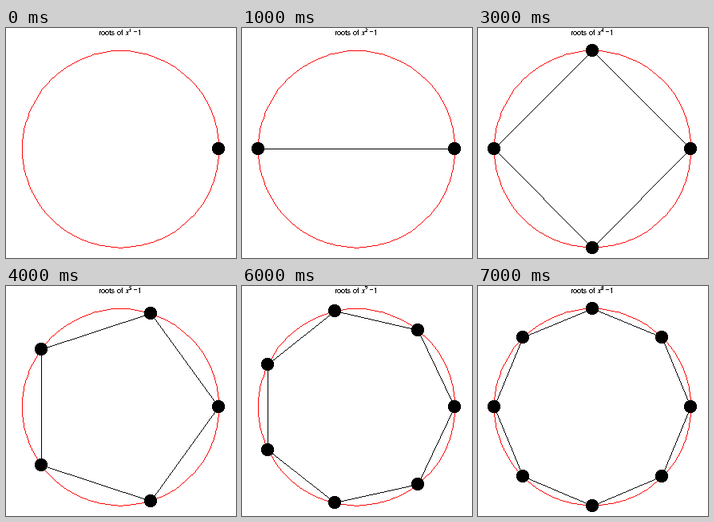
A matplotlib script for the animation above (8000 ms loop, 288x288 px).

```python
import numpy as np
import matplotlib.pyplot as plt
from matplotlib.animation import FuncAnimation

SIZE = 288
CX, CY, R = 143.2, 151.35, 123.2
DOT = 8
MAX_ORDER = 8
RED, BLACK = (255, 0, 0), (0, 0, 0)

# Crisp, unsmoothed lettering.
plt.rcParams.update({"font.family": "Liberation Serif",
                     "text.hinting": "default",
                     "text.hinting_factor": 1})

# At 72 dpi one point equals one pixel.
fig = plt.figure(figsize=(SIZE / 72, SIZE / 72), dpi=72, facecolor="white")
ax = fig.add_axes([0, 0, 1, 1])
ax.axis("off")

rows, cols = np.mgrid[:SIZE, :SIZE]


def ring(count):
    """Pixels evenly spaced on the circle, starting at the right, closed."""
    a = 2 * np.pi * np.arange(count + 1) / count
    points = np.column_stack([CX + R * np.cos(a), CY - R * np.sin(a)])
    return np.rint(points).astype(int)


def draw_path(img, points, color):
    """Join the points with unsmoothed lines one pixel wide."""
    for start, end in zip(points[:-1], points[1:]):
        steps = np.abs(end - start).max() + 1
        x, y = np.rint(np.linspace(start, end, steps)).astype(int).T
        img[y, x] = color


def draw_dot(img, point):
    x, y = point - 0.5
    img[np.hypot(cols - x, rows - y) <= DOT] = BLACK


def draw_roots(order):
    img = np.full((SIZE, SIZE, 3), 255, dtype=np.uint8)
    draw_path(img, ring(96), RED)
    points = ring(order)
    draw_path(img, points, BLACK)
    for point in points[:-1]:
        draw_dot(img, point)
    return img


def label(x, y, text, size=10, style="normal"):
    return ax.text(x, y, text, fontsize=size, style=style, color="black",
                   ha="left", va="baseline", antialiased=False)


picture = ax.imshow(draw_roots(1), interpolation="nearest", aspect="auto")
label(115.5, 8.5, "roots of")
label(149.5, 8.5, "x", style="italic")
power = label(153.5, 4.5, "", size=7)
label(158.5, 8.5, "=")
label(164.5, 8.5, "1")


def update(i):
    order = i % MAX_ORDER + 1
    picture.set_data(draw_roots(order))
    power.set_text(str(order))
    return picture, power


anim = FuncAnimation(fig, update, frames=MAX_ORDER, interval=1000,
                     repeat=True, repeat_delay=0)
plt.show()
```
